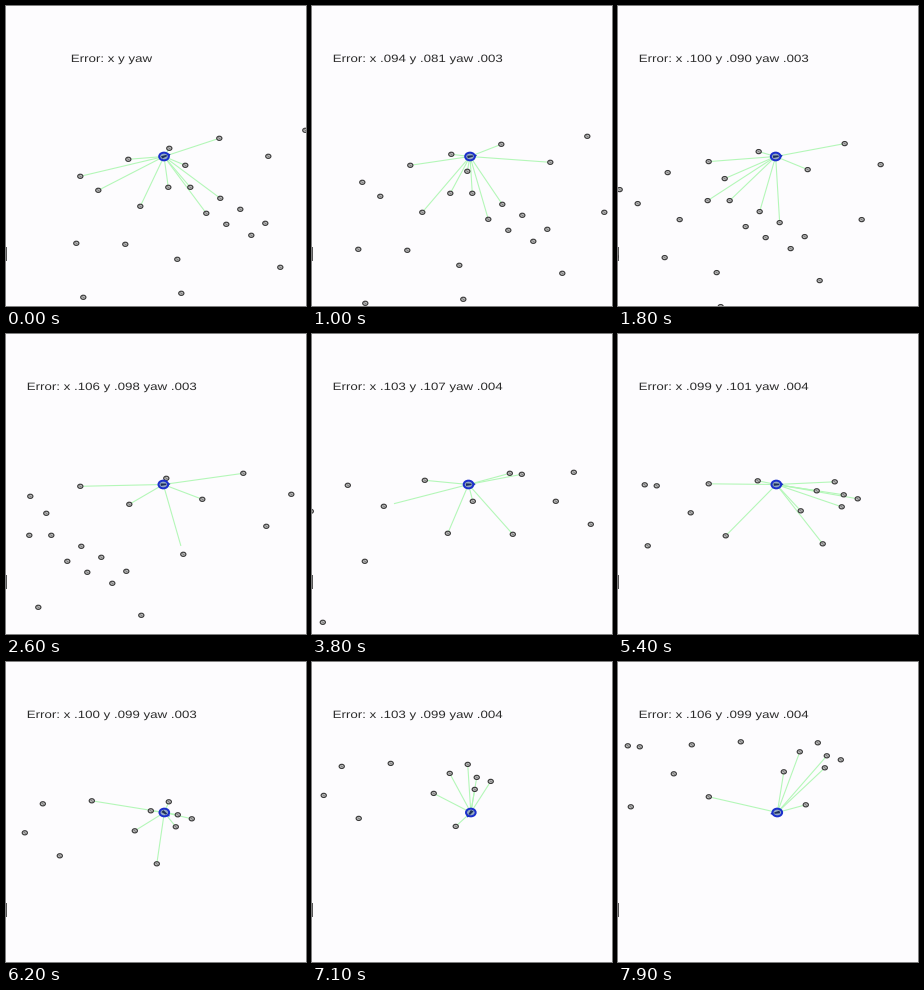
A matplotlib script for the animation above (8000 ms loop, 300 px wide and 300 px high).

```python
import numpy as np
import matplotlib.pyplot as plt
from matplotlib.animation import FuncAnimation
from matplotlib.collections import EllipseCollection, LineCollection
from matplotlib.patches import Ellipse, PathPatch, Polygon, Rectangle
from matplotlib.textpath import TextPath
from matplotlib.transforms import Affine2D

SIZE, DPI = 300, 100
PX = 72 / DPI            # one pixel in points
SQUASH = 0.8             # the whole scene is flattened vertically
RANGE = 89.6             # sensor range
HOLD = 3                 # ticks before the car starts
FRAMES, TICK = 80, 100
FONT = {"family": "Liberation Sans"}

LANDMARKS = np.array([
    (213, 132), (163, 142), (122, 153), (179, 159), (74, 170), (92, 184),
    (162, 181), (184, 181), (134, 200), (200, 207), (214, 192), (234, 203),
    (220, 218), (245, 229), (259, 217), (262, 150), (299, 124), (70, 237),
    (119, 238), (171, 253), (175, 287), (77, 291), (274, 261), (316, 200),
    (376, 119), (424, 140), (335, 145), (399, 172), (461, 112), (473, 113),
    (525, 111), (507, 140), (464, 173), (542, 163), (574, 108), (633, 118),
    (651, 109), (660, 122), (658, 134), (617, 138), (639, 171), (674, 126),
], float) + 0.3

# step, map shift x, map shift y
ROUTE = np.array([
    (0, 0, 0), (7, -24, 6), (23, -139, 20), (35, -263.5, 27),
    (44, -364, 33), (54, -459, 38), (59, -488.5, 30.5), (63, -498, 15),
    (67, -498, -3), (72, -477.5, -20), (76, -451.5, -28.5),
])
# step, error in x, y and yaw (thousandths), car x
STATS = np.array([
    (0, 90, 72, 3, 158), (7, 94, 81, 3, 158), (23, 106, 98, 3, 157.3),
    (35, 103, 107, 4, 156.5), (44, 99, 102, 4, 158.3),
    (59, 100, 99, 3, 158.3), (76, 106, 99, 4, 159.3),
])
CAR_Y = 150.5
SLOPES = np.gradient(ROUTE[:, 1:], ROUTE[:, 0], axis=0, edge_order=2)


def shift(step):
    """Map offset along a smooth cubic through the route."""
    t = ROUTE[:, 0]
    i = int(np.clip(np.searchsorted(t, step, "right") - 1, 0, len(t) - 2))
    h = t[i + 1] - t[i]
    u = (step - t[i]) / h
    a, b = ROUTE[i, 1:], ROUTE[i + 1, 1:]
    return ((1 + 2 * u) * (1 - u) ** 2 * a + u * (1 - u) ** 2 * h * SLOPES[i]
            + u * u * (3 - 2 * u) * b + u * u * (u - 1) * h * SLOPES[i + 1])


def stat(step, col):
    return np.interp(step, STATS[:, 0], STATS[:, col])


def caption(step):
    if step == 0:
        return "Error: x y yaw"
    x, y, yaw = (int(round(stat(step, c))) for c in (1, 2, 3))
    return f"Error: x .{x:03d} y .{y:03d} yaw .{yaw:03d}"


def flat_text(text, cx, base, size):
    path = TextPath((0, 0), text, size=size, prop=FONT)
    box = path.get_extents()
    flat = Affine2D().translate(-(box.x0 + box.x1) / 2, 0)
    return path.transformed(flat.scale(1, -SQUASH).translate(cx, base))


fig = plt.figure(figsize=(SIZE / DPI, SIZE / DPI), dpi=DPI, facecolor="#fdfcfe")
ax = fig.add_axes([0, 0, 1, 1])
ax.set_xlim(0, SIZE)
ax.set_ylim(SIZE, 0)
ax.axis("off")

ax.add_patch(Rectangle((0, 241), 0.9, 14, fc="#555555", lw=0))
label = ax.add_patch(PathPatch(flat_text(caption(0), 106, 56, 13.3),
                               fc="#2c2c2c", lw=0))

rays = LineCollection([], colors="#b4f7b8", linewidths=1.1 * PX, zorder=2)
ax.add_collection(rays)

n = len(LANDMARKS)
rings = EllipseCollection(
    np.full(n, 5.2), np.full(n, 5.2 * SQUASH), np.zeros(n), units="xy",
    offsets=LANDMARKS, offset_transform=ax.transData,
    facecolors="#c4c4c4", edgecolors="#3a3a3a", linewidths=1.15 * PX, zorder=3)
ax.add_collection(rings)
ticks = LineCollection([], colors="#777777", linewidths=0.9 * PX, zorder=4)
ax.add_collection(ticks)

nose = ax.add_patch(Polygon(np.zeros((3, 2)), fc="#1a2fb4", lw=0, zorder=5))
body = ax.add_patch(Ellipse((158, CAR_Y), 9.6, 9.6 * SQUASH, fc="#93a9c4",
                            ec="#1b2fcb", lw=2 * PX, zorder=6))
hull = ax.add_patch(Polygon(np.zeros((4, 2)), fc="#1d2f5c", lw=0, zorder=7))


def placed(shape, angle, car):
    c, s = np.cos(angle), np.sin(angle)
    pts = np.array(shape) @ np.array([[c, s], [-s, c]])
    return pts * (1, SQUASH) + car


def draw(frame):
    step = max(0, frame - HOLD)
    car = np.array([stat(step, 4), CAR_Y])
    pts = LANDMARKS + shift(step)

    rings.set_offsets(pts)
    ticks.set_segments([[p - (1.2, 0.8), p + (1.2, 0.8)] for p in pts])

    gap = pts - car
    dist = np.hypot(gap[:, 0], gap[:, 1] / SQUASH)
    reach = np.where(dist > 88.5, 0.88, 1)[:, None]
    ends = car + gap * reach
    rays.set_segments([[car, e] for e in ends[dist < RANGE]])

    # the car heads against the map's drift
    lo, hi = max(0, step - 0.5), min(76, step + 0.5)
    vx, vy = shift(lo) - shift(hi)
    angle = np.arctan2(vy / SQUASH, vx)
    nose.set_xy(placed([(7.2, 0), (3, 3.6), (3, -3.6)], angle, car))
    hull.set_xy(placed([(3, 0.9), (3, -0.9), (-2.6, -1.6), (-2.6, 1.6)],
                       angle, car))
    body.center = car

    label.set_path(flat_text(caption(step), 106, 56, 13.3))
    return label, rays, rings, ticks, nose, body, hull


anim = FuncAnimation(fig, draw, frames=FRAMES, interval=TICK,
                     repeat=True, repeat_delay=0, blit=False)
plt.show()
```
